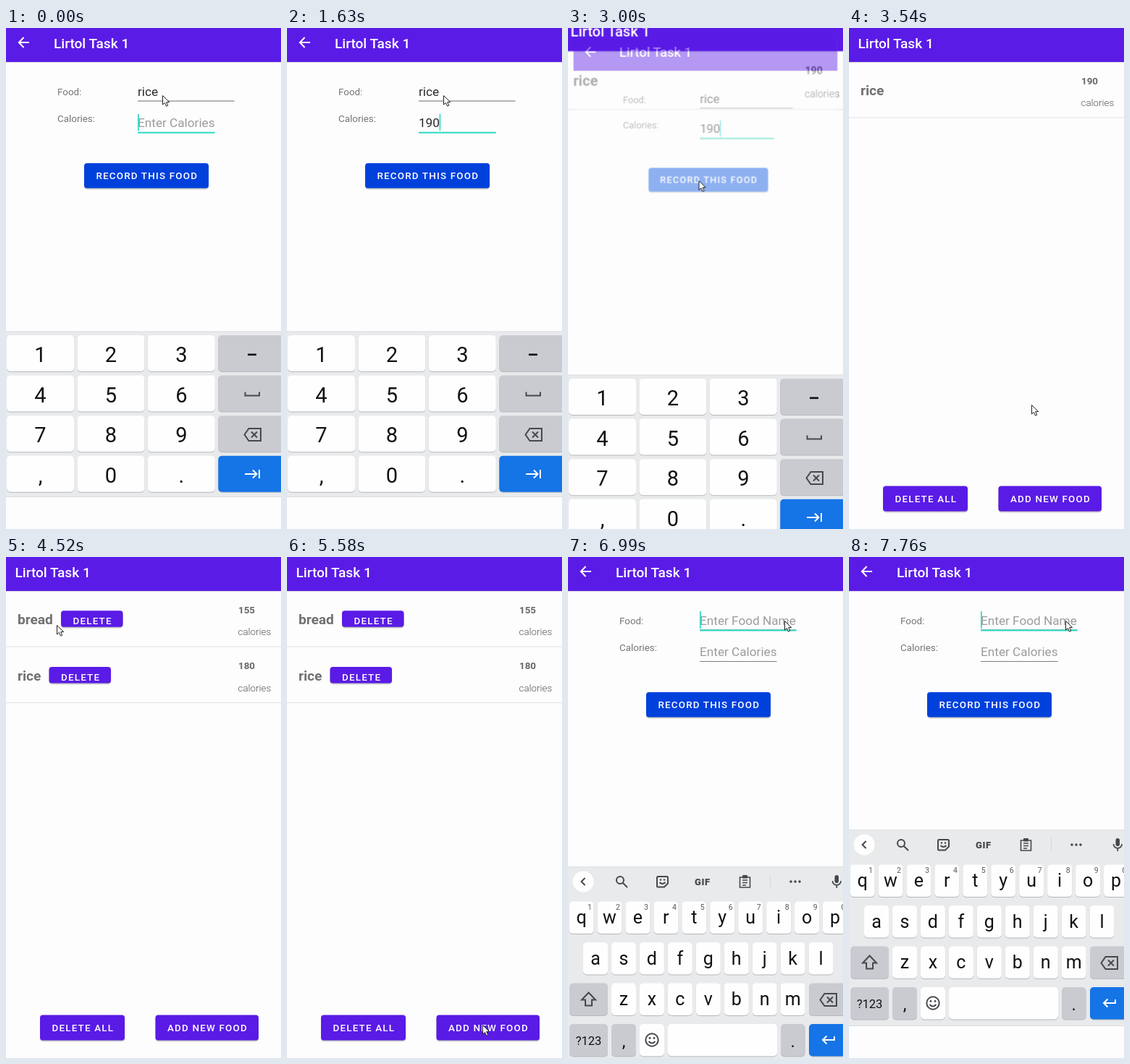
Recreate the animation shown at these times as an HTML page. Size 380x693 px, loop 8000 ms.

```html
<!DOCTYPE html>
<html lang="en">
<head>
<meta charset="utf-8">
<title>Food log</title>
<style>
html, body { margin: 0; width: 100%; height: 100%; overflow: hidden; background: #fdfdfd; }
svg { display: block; width: 380px; height: 693px; overflow: hidden; font-family: Roboto, "Noto Sans", sans-serif; }
#list, #form { transform-origin: 190px 346.5px; }
.bar { fill: #5a1be6; }
.title { font-size: 19.1px; font-weight: 500; fill: #fff; }
.btn { font-size: 13.4px; font-weight: 500; letter-spacing: 1.2px; fill: #fff; }
.label { font-size: 13.4px; fill: #757575; }
.field { font-size: 17.2px; fill: #2a2a2a; }
.hint { font-size: 17.2px; fill: #9c9c9c; }
.name { font-size: 19.1px; font-weight: 700; fill: #707070; }
.count { font-size: 13.4px; font-weight: 700; fill: #666; }
.unit { font-size: 13.4px; font-weight: 300; fill: #555; }
.teal { fill: #2bd9c3; }
.key { fill: #111; text-anchor: middle; }
.line { fill: none; stroke: #45484c; stroke-width: 2; }
.white { stroke: #fff; }
</style>
</head>
<body>
<svg id="stage" viewBox="0 0 380 693"></svg>
<script>
const LOOP = 8000;
const WHITE = '#fefefe', GREY = '#cacbd1', BLUE = '#1574e6';

const rect = (x, y, w, h, fill, r = 0, more = '') =>
  `<rect x="${x}" y="${y}" width="${w}" height="${h}" rx="${r}" fill="${fill}" ${more}/>`;
const text = (x, y, cls, str, more = '') => `<text x="${x}" y="${y}" class="${cls}" ${more}>${str}</text>`;
const path = (d, cls = 'line', more = '') => `<path d="${d}" class="${cls}" ${more}/>`;
const group = (id, body) => `<g id="${id}">${body}</g>`;
const dot = (x, y, r, fill = '#45484c') => `<circle cx="${x}" cy="${y}" r="${r}" fill="${fill}"/>`;

const button = (x, y, w, h, fill, label, textY, id = '') =>
  rect(x - .5, y + .5, w + 1, h + 2, '#000', 5, 'opacity=".08"') +
  rect(x, y + 1, w, h, '#000', 4, 'opacity=".22"') +
  rect(x, y, w, h, fill, 4, id && `id="${id}"`) +
  text(x + 16.5, textY, 'btn', label);

const screen = (titleX, body) =>
  rect(0, 0, 380, 693, '#fdfdfd') +
  rect(0, 47, 380, 1, '#000', 0, 'opacity=".13"') +
  rect(0, 0, 380, 47, '#5a1be6') +
  text(titleX, 27.5, 'title', 'Lirtol Task 1') + body;

function row(i, name, count, deleteX) {
  const y = 47 + i * 77.6;
  return text(16, y + 46, 'name', name) +
    text(321, y + 30.5, 'count', count) +
    text(320.5, y + 61, 'unit', 'calories') +
    rect(0, y + 76.5, 380, 1, '#e0e0e0') +
    (deleteX ? button(deleteX, y + 27.3, 85.5, 22.5, '#5a1be6', 'DELETE', y + 46) : '');
}

const list = screen(12.5,
  group('one', row(0, 'rice', 190)) +
  group('two', row(0, 'bread', 155, 76) + row(1, 'rice', 180, 59.5)) +
  button(47, 633.5, 117, 35, '#5a1be6', 'DELETE ALL', 656.3) +
  button(206.5, 633.5, 142.5, 35, '#5a1be6', 'ADD NEW FOOD', 656.3, 'add'));

const form = screen(66,
  path('M32 20H18M24.5 13L17.8 20L24.5 27', 'line white') +
  text(71, 93.3, 'label', 'Food:') +
  text(71, 130, 'label', 'Calories:') +
  group('food', text(182, 94, 'field', 'rice')) +
  group('foodHint', text(182, 94, 'hint', 'Enter Food Name')) +
  group('foodLine', rect(182, 100.5, 133.5, 1, '#6c6c6c')) +
  group('foodFocus', rect(182, 100.5, 133.5, 2, '#2bd9c3')) +
  group('calHint', text(182, 137, 'hint', 'Enter Calories')) +
  [1, 9, 0].map((n, i) => group('digit' + i, text(182 + i * 9.6, 137, 'field', n))).join('') +
  group('calLine', rect(182, 144, 106.5, 1, '#7c7c7c')) +
  group('calFocus', rect(182, 143.7, 106.5, 2, '#2bd9c3')) +
  group('foodCaret', rect(182, 75, 1.7, 24, '#2bd9c3')) +
  group('calCaret', rect(182, 119, 1.7, 23, '#2bd9c3')) +
  button(108, 187, 172, 34.5, '#0041dc', 'RECORD THIS FOOD', 209.3, 'record'));

function key(x, y, w, h, fill, label = '', size = 25, base = 30.5) {
  return rect(x, y + 1, w, h, '#b6b8bc', 5) + rect(x, y, w, h, fill, 5) +
    (label === '' ? '' : text(x + w / 2, y + base, 'key', label, `font-size="${size}"`));
}

const erase = (x, y) => path(`M${x - 11} ${y}l6-8.5h16.5v17H${x - 5}z`) +
  path(`M${x - 1.5} ${y - 4}l8 8m0-8l-8 8`);

const panel = (y, h) => rect(0, y, 380, h, '#e8eaec') +
  rect(0, y, 380, 1, '#dfe0e2') + rect(0, y + h - 1, 380, 1, '#dcdde0');

function numpad() {
  let out = panel(419.5, 229.5);
  ['123', '456', '789', ',0.'].forEach((keys, r) => {
    const y = 425 + r * 55.6;
    [...keys].forEach((k, c) => out += key(1 + c * 97.4, y, 93, 50, WHITE, k, 29, 37));
    out += key(293.3, y, 93, 50, r < 3 ? GREY : BLUE);
  });
  return out + rect(334, 450.5, 12, 2.6, '#111') +
    path('M330.5 503.5V508.5H350V503.5') + erase(340.5, 562.5) +
    path('M330 617H346M341 611.5L346.5 617L341 622.5M350 611V623', 'line white');
}

function toolbar(y) {
  return dot(21, y, 14.5, WHITE) + path(`M23.5 ${y - 5}l-5 5 5 5`) +
    `<circle cx="72" cy="${y - 2}" r="5" class="line"/>` + path(`M75.5 ${y + 1.5}l6.5 6.5`) +
    path(`M124.5 ${y - 7}h12a1.5 1.5 0 0 1 1.5 1.5v8l-5 5h-8.500a1.500 1.500 0 0 1-1.500-1.500v-11.500a1.500 1.500 0 0 1 1.500-1.500M126.500 ${y + 1}q4 4 8 0`, 'line', 'stroke-width="1.7"') +
    dot(128, y - 2.5, 1.2) + dot(133, y - 2.5, 1.2) +
    text(175, y + 4.5, '', 'GIF', 'font-size="13" font-weight="900" fill="#45484c" letter-spacing=".6"') +
    path(`M237.500 ${y - 6}h14v14h-14zM241 ${y - 2}h7m-7 3.500h7m-7 3.500h5`, 'line', 'style="stroke-width:1.6"') +
    rect(241, y - 9, 7, 4.5, '#45484c', 1) +
    rect(279, y - 10, 1, 20, '#d6d8db') +
    [308, 314, 320].map(x => dot(x, y, 1.8)).join('') +
    rect(368.5, y - 9, 5.5, 11, '#45484c', 2.7) +
    path(`M365.500 ${y - 1}a5.800 5.800 0 0 0 11.600 0M371.300 ${y + 5}v4`, 'line', 'style="stroke-width:1.7"');
}

function qwerty() {
  const top = 425.5, pitch = 56.5;
  const y = r => top + r * pitch;
  let out = panel(377, 272) + toolbar(398);
  ['qwertyuiop', 'asdfghjkl', 'zxcvbnm'].forEach((letters, r) => {
    [...letters].forEach((k, c) => {
      const x = [1.5, 21, 60][r] + c * 38.95;
      out += key(x, y(r), 34, 44.5, WHITE, k);
      if (r === 0) out += text(x + 28.5, y(0) + 11, 'key', (c + 1) % 10, 'font-size="10.5" style="fill:#55585c"');
    });
  });
  out += key(2, y(2), 53, 44.5, GREY) + key(333, y(2), 53, 44.5, GREY) + erase(359.5, y(2) + 23) +
    path(`M28.500 ${y(2) + 13}l9.500 10h-5v8h-9v-8h-5z`);
  out += key(2, y(3), 53, 44.5, GREY, '?123', 16.5, 28.5) +
    key(60, y(3), 34, 44.5, GREY, ',', 24, 31.5) +
    key(99, y(3), 34, 44.5, WHITE) +
    key(138, y(3), 151, 44.5, WHITE) +
    key(294, y(3), 33.5, 44.5, GREY, '.', 24, 31.5) +
    key(333, y(3), 53, 44.5, BLUE);
  const mid = y(3) + 22;
  return out + `<circle cx="116" cy="${mid}" r="8.700" class="line"/>` +
    dot(113, mid - 2.5, 1.4) + dot(119, mid - 2.5, 1.4) +
    path(`M111.500 ${mid + 2}q4.500 5 9 0`) +
    path(`M368 ${mid - 5}v5h-16m5.500-5.500l-5.500 5.500 5.500 5.500`, 'line white');
}

document.getElementById('stage').innerHTML =
  rect(0, 0, 380, 693, '#fdfdfd') + rect(0, 0, 380, 47, '#5a1be6') + rect(0, 691, 380, 2, '#666') +
  group('list', list) + group('form', form) +
  group('numpad', numpad()) + group('qwerty', qwerty()) +
  group('mouse', path('M.5 .5V13l3-2.600 2 4.800 2.200-1-2-4.600h4z', '', 'fill="#fff" stroke="#222"'));

// Each track maps a time in ms to the style held from then on.
let css = '';
function track(id, steps) {
  const frames = Object.entries(steps).map(([ms, style]) => `${ms / LOOP * 100}%{${style}}`);
  css += `@keyframes ${id}{${frames.join('')}}#${id}{animation:${id} ${LOOP}ms step-end infinite}`;
}
const fade = (v, more = '') => `opacity:${v};${more}`;
const zoom = (s, v = 1) => `transform:scale(${s});opacity:${v}`;
const drop = (y, v = 1) => `transform:translateY(${y}px);opacity:${v}`;
const blink = (id, ...times) =>
  track(id, Object.fromEntries(times.map((ms, i) => [ms, fade((i + 1) % 2)])));

track('list', { 0: zoom(1, 0), 3000: zoom(1.05), 3120: zoom(1.015), 3270: zoom(1.003), 3390: zoom(1),
  5980: zoom(1.05), 6110: zoom(1.11), 6230: zoom(1, 0) });
track('form', { 0: zoom(1), 3000: zoom(.96, .45), 3120: zoom(.92, 0),
  5980: zoom(.93, .6), 6110: zoom(.98), 6230: zoom(.997), 6350: zoom(1) });
track('numpad', { 0: drop(0), 3000: drop(60), 3120: drop(180), 3270: drop(280, 0) });
track('qwerty', { 0: drop(320, 0), 6870: drop(180), 6990: drop(51), 7240: drop(4), 7360: drop(0) });

blink('one', 0, 4400);
blink('food', 0, 5900);
blink('calFocus', 0, 5900);
blink('calHint', 0, 1380, 5900);
track('two', { 0: fade(0), 4400: fade(1) });
track('foodHint', { 0: fade(0), 5900: fade(1) });
track('foodFocus', { 0: fade(0), 6740: fade(1) });
track('foodCaret', { 0: fade(0), 6740: fade(1), 7360: fade(0), 7760: fade(1) });
[1380, 1500, 1630].forEach((ms, i) => track('digit' + i, { 0: fade(0), [ms]: fade(1), 5900: fade(0) }));

const caret = n => fade(1, `transform:translateX(${n * 9.5}px)`);
track('calCaret', { 0: caret(0), 260: fade(0), 690: caret(0), 1380: caret(1), 1500: caret(2), 1630: caret(3),
  2160: fade(0), 2730: caret(3), 5900: fade(0) });
track('record', { 0: 'fill:#0041dc', 2850: 'fill:#0452e1', 5900: 'fill:#0041dc' });
track('add', { 0: 'fill:#5a1be6', 5700: 'fill:#6c33ea', 5830: 'fill:#7a48ec' });

const at = (x, y, v = 1) => `transform:translate(${x}px,${y}px);opacity:${v}`;
track('mouse', { 0: at(216, 93), 2310: at(199, 185), 2450: at(197, 206), 2730: at(180.5, 211),
  3540: at(252, 521), 3820: at(276, 659), 3940: at(276, 659, 0),
  4400: at(70, 94), 4670: at(112, 142), 4790: at(170, 200), 4910: at(225, 258), 5040: at(265, 302),
  5190: at(273, 468), 5340: at(272, 600), 5460: at(270, 645), 5580: at(270, 647),
  5980: at(262, 480), 6110: at(254, 350), 6230: at(249, 278), 6470: at(270, 190), 6620: at(292, 110), 6740: at(299, 88) });

document.head.append(Object.assign(document.createElement('style'), { textContent: css }));
</script>
</body>
</html>
```
